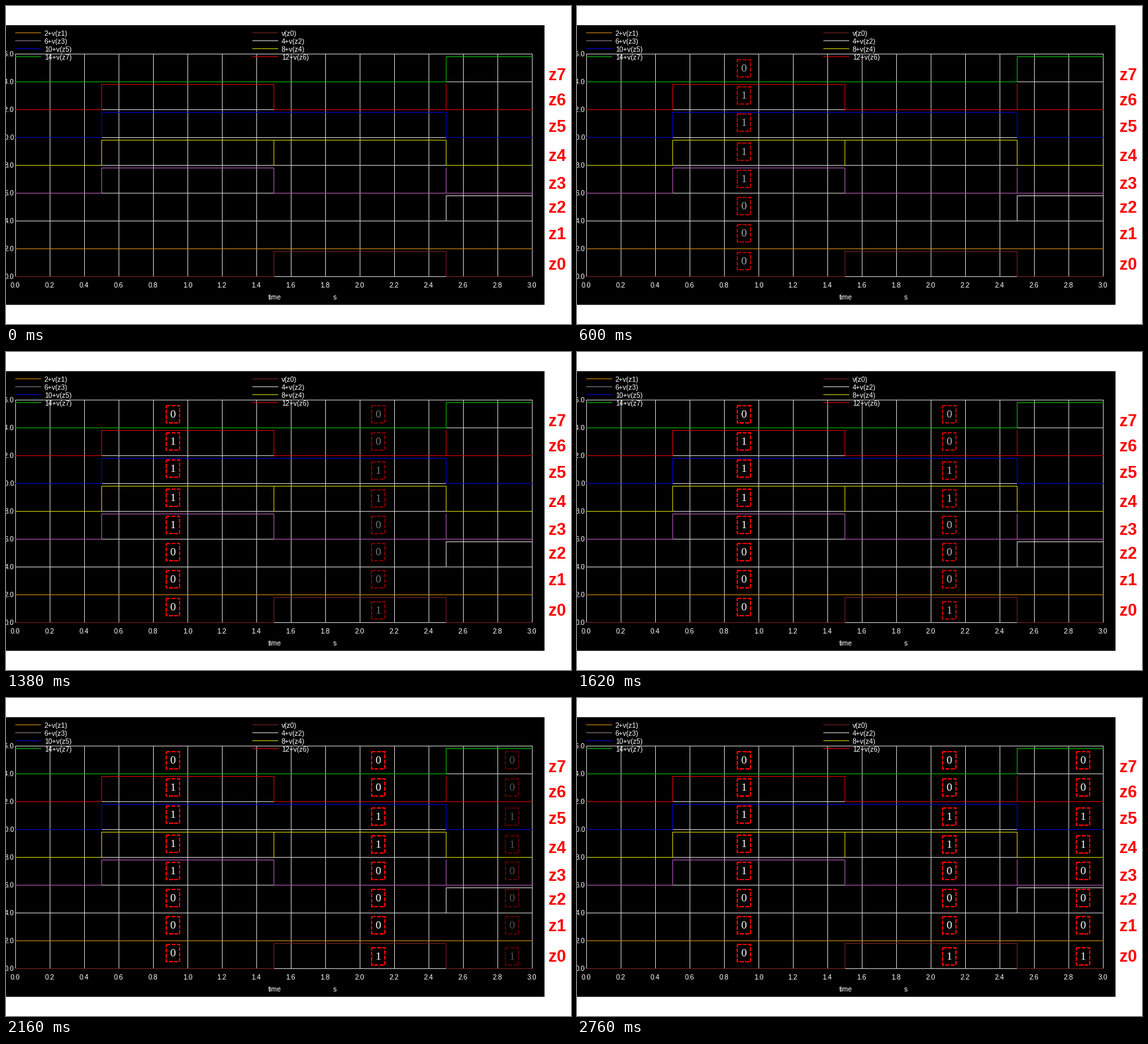
Recreate the animation shown at these times as a matplotlib script. Size 853x480 px, loop 2820 ms.

```python
import matplotlib.pyplot as plt
import numpy as np
from matplotlib.animation import FuncAnimation
from matplotlib.patches import Rectangle

W, H, DPI = 853, 480, 64
PT = 72 / DPI  # points per pixel
FRAMES, STEP = 47, 60
FADE = 15

GRID = "#c8c8c8"
COLORS = ["#7a1f1f", "#cc8410", "#d0d0d0", "#b355b3",
          "#cccc00", "#0000dc", "#d80000", "#00b800"]
# Level in each interval between the switching times, plus short glitches
LEVELS = ["0010", "0000", "0001", "0100", "0110", "0110", "0100", "0001"]
SWITCH = [0, 0.5, 1.5, 2.5, 3]
GLITCHES = {3: 2.5, 4: 1.5, 6: 2.5}

fig = plt.figure(figsize=(W / DPI, H / DPI), dpi=DPI, facecolor="white")
ax = fig.add_axes([0, 0, 1, 1])
ax.set_xlim(0, W)
ax.set_ylim(H, 0)
ax.axis("off")


# Both return pixel centres, so unsnapped one-pixel lines stay crisp.
def px(t):
    return 14.5 + np.round(260 * np.asarray(t))


def py(v):
    return 408.5 - np.round(21 * np.asarray(v))


def line(xs, ys, color, z=2):
    ax.plot(xs, ys, color=color, lw=PT, zorder=z, snap=False,
            solid_capstyle="projecting", solid_joinstyle="miter")


def label(x, y, s, size=10.5, color="white", ha="left",
          font="Liberation Sans", weight="normal"):
    return ax.text(x, y, s, fontsize=size * PT, color=color, ha=ha,
                   va="baseline", family=font, weight=weight, zorder=5)


def draw_grid():
    ax.add_patch(Rectangle((0, 29), 813, 422, color="black", lw=0, zorder=0))
    for k in range(16):
        t = k / 5
        line([px(t)] * 2, [py(0), py(16)], GRID, 1)
        label(px(t) - 0.5, 425, f"{t:.1f}", ha="center")
    for v in range(0, 17, 2):
        line([px(0), px(3)], [py(v)] * 2, GRID, 1)
        label(12, py(v) + 3.5, f"{v:.1f}", ha="right")
    label(396, 443, "time")
    label(494, 443, "s")


def draw_traces():
    for n, levels in enumerate(LEVELS):
        ts = np.repeat(SWITCH, 2)[1:-1]
        vs = np.repeat([2 * n + 1.8 * int(b) for b in levels], 2)
        line(px(ts), py(vs), COLORS[n])
        if n in GLITCHES:
            x = px(GLITCHES[n])
            line([x, x], [py(2 * n), py(2 * n + 1.8)], COLORS[n])


def draw_legend():
    for i, n in enumerate([1, 0, 3, 2, 5, 4, 7, 6]):
        x, y = 14 + 358 * (i % 2), 41 + 12 * (i // 2)
        color = "#8c788c" if n == 3 else COLORS[n]
        line([x + 0.5, x + 38.5], [y - 0.5] * 2, color, 3)
        offset = f"{2 * n}+" if n else ""
        label(x + 44, y + 4, f"{offset}v(z{n})")


def draw_names():
    for i, y in enumerate([104, 141, 181, 226, 267, 304, 344, 389]):
        label(819.5, y + 8.5, f"z{7 - i}", 25, "red", weight="bold")


def bit_column(x, bits, centers):
    parts = []
    for bit, y in zip(bits, centers):
        box = Rectangle((x - 10, y - 13), 20, 26, fill=False, ec="red",
                        lw=2 * PT, ls=(0, (3, 1)), capstyle="butt",
                        joinstyle="miter", snap=False, zorder=4)
        ax.add_patch(box)
        digit = label(x - 0.5, y + 5, bit, 17, "white", "center",
                      "Liberation Serif")
        parts += [box, digit]
    return parts


draw_grid()
draw_traces()
draw_legend()
draw_names()

ROWS_A = [94, 135, 176, 220, 261, 302, 343, 385]
ROWS_B = [94, 135, 179, 221, 261, 302, 343, 390]
columns = [
    (0, bit_column(252, "01111000", ROWS_A)),
    (16, bit_column(562, "00110001", ROWS_B)),
    (31, bit_column(764, "00110001", ROWS_B)),
]


def update(i):
    for start, parts in columns:
        alpha = min(max((i - start) / FADE, 0), 1)
        for part in parts:
            part.set_alpha(alpha)
    return [part for _, parts in columns for part in parts]


anim = FuncAnimation(fig, update, frames=FRAMES, interval=STEP,
                     repeat=True, repeat_delay=0, blit=False)
plt.show()
```
